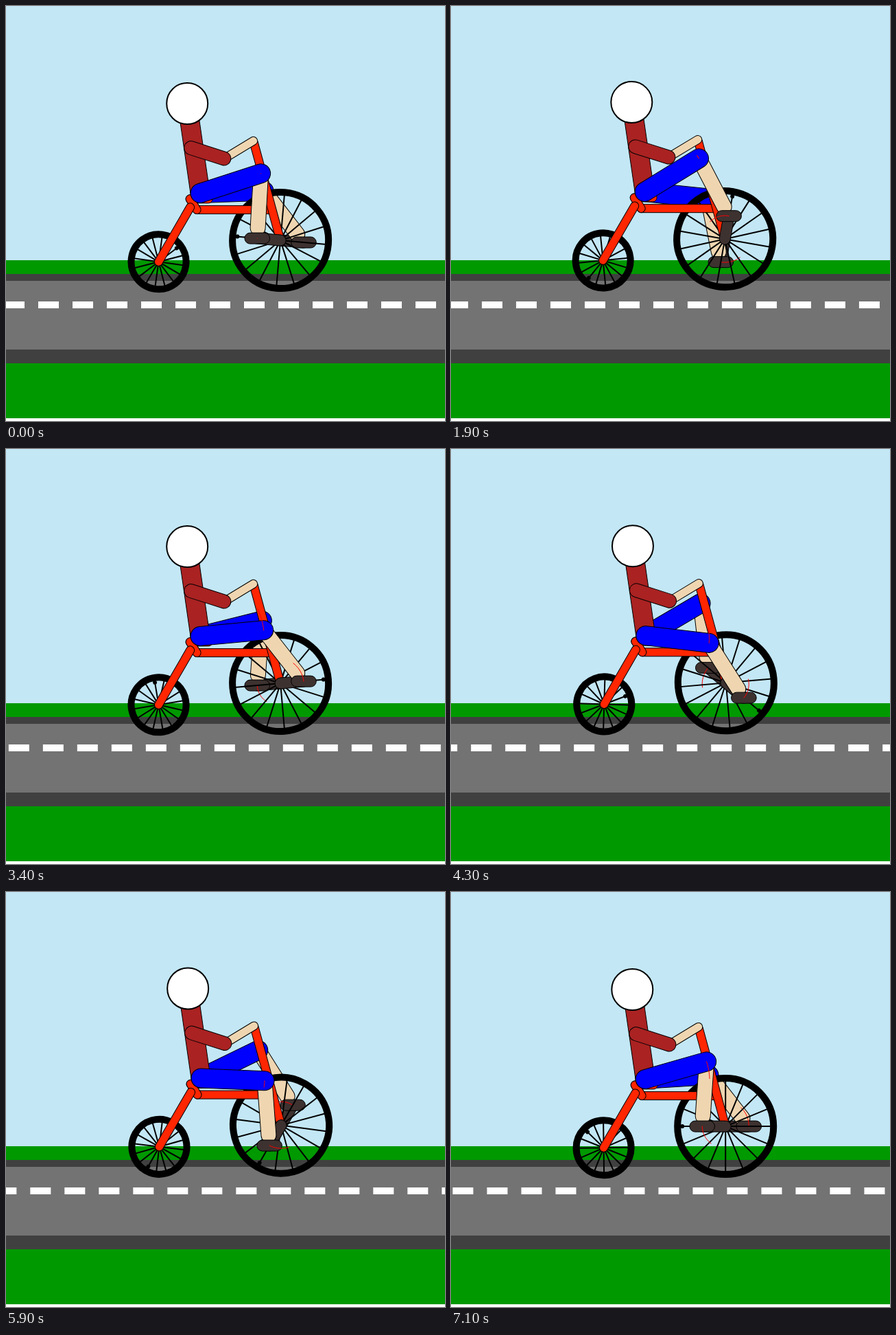
Write an HTML page that moves like this. It is 640 px wide and 604 px high and loops after 7.2 s.

```html
<!DOCTYPE html>
<html lang="en">
<head>
<meta charset="utf-8">
<title>Cyclist</title>
<style>
html, body { margin: 0; width: 100%; height: 100%; overflow: hidden; background: #fff; }
svg { display: block; width: 100vw; height: 100vh; }
</style>
</head>
<body>
<svg id="stage" viewBox="0 0 640 604" preserveAspectRatio="none"></svg>
<script>
const NS = 'http://www.w3.org/2000/svg';
const STEP = 100, STEPS = 72, TRAIL = 10, SPOKES = 16;
const RED = '#ff2600', BLUE = '#0000ff', SKIN = '#efd6b1', SHIRT = '#aa2222', SHOE = '#3d3230';
const CRANK = 34, THIGH = 93, SHIN = 94.5, ANKLE = 15;
const HIP = [-117, -68.7], AXLE = [-177.6, 31.2];
const rad = d => d * Math.PI / 180;

function add(parent, tag, attrs) {
  const el = document.createElementNS(NS, tag);
  for (const k in attrs) el.setAttribute(k, attrs[k]);
  return parent.appendChild(el);
}

// Outlined rounded bar between two points
function bar(parent, r, fill, a, b) {
  const el = add(parent, 'rect', { rx: r, height: 2 * r, fill, stroke: '#000', 'stroke-width': 1 });
  const set = (p, q) => {
    const dx = q[0] - p[0], dy = q[1] - p[1];
    el.setAttribute('x', -r);
    el.setAttribute('y', -r);
    el.setAttribute('width', Math.hypot(dx, dy) + 2 * r);
    el.setAttribute('transform',
      `translate(${p[0]} ${p[1]}) rotate(${Math.atan2(dy, dx) * 180 / Math.PI})`);
  };
  if (a) set(a, b);
  return set;
}

function wheel(parent, [x, y], r) {
  const g = add(parent, 'g', {});
  let d = '';
  for (let i = 0; i < SPOKES; i++) {
    const a = rad(i * 360 / SPOKES);
    d += `M0 0L${-r * Math.cos(a)} ${-r * Math.sin(a)}`;
  }
  add(g, 'path', { d, stroke: '#000', 'stroke-width': 2 });
  add(g, 'circle', { r, fill: 'none', stroke: '#000', 'stroke-width': 10 });
  add(g, 'circle', { cx: 7 - r, r: 3 });
  return a => g.setAttribute('transform', `translate(${x} ${y}) rotate(${a})`);
}

function makeLeg(parent) {
  const crank = bar(parent, 8, SHOE);
  const shin = bar(parent, 11, SKIN);
  const shoe = bar(parent, 8, SHOE);
  const thigh = bar(parent, 14, BLUE);
  return (pedal, knee) => {
    const k = ANKLE / SHIN;
    crank([0, 0], pedal);
    shin(knee, [pedal[0] + (knee[0] - pedal[0]) * k, pedal[1] + (knee[1] - pedal[1]) * k]);
    shoe([pedal[0] - 10.3, pedal[1]], [pedal[0] + 10.3, pedal[1]]);
    thigh(HIP, knee);
  };
}

const makeTrail = parent => add(parent, 'path',
  { fill: 'none', stroke: '#f00', 'stroke-width': 1, 'stroke-linecap': 'round' });

// Motion
const turn = n => 5 * (n + 1);
const hub = n => {
  const a = rad(turn(n));
  return [400.2 - Math.sin(a), 340.1 + Math.cos(2 * a)];
};
const pedalAt = (n, phase) => {
  const a = rad(turn(n) + phase);
  return [-CRANK * Math.cos(a), -CRANK * Math.sin(a)];
};
function kneeFor(p) {
  const dx = p[0] - HIP[0], dy = p[1] - HIP[1], d = Math.hypot(dx, dy);
  const along = (d * d + THIGH * THIGH - SHIN * SHIN) / (2 * d);
  const off = Math.sqrt(THIGH * THIGH - along * along);
  return [HIP[0] + (dx * along + dy * off) / d, HIP[1] + (dy * along - dx * off) / d];
}
function trace(el, n, at) {
  const c = hub(n), pts = [];
  for (let i = Math.max(0, n - TRAIL); i <= n; i++) {
    const p = at(i), h = hub(i);
    pts.push(`${p[0] + h[0] - c[0]} ${p[1] + h[1] - c[1]}`);
  }
  if (n === 0) pts.push(pts[0]);
  el.setAttribute('d', 'M' + pts.join('L'));
}

// Scenery
const stage = document.getElementById('stage');
const band = (y, height, fill) => add(stage, 'rect', { y, width: 640, height, fill });
band(0, 370, '#c3e7f5');
band(370, 230, '#009900');
band(390, 130, '#404040');
band(400, 100, '#737373');
const dashes = add(stage, 'path',
  { d: 'M0 435H750', stroke: '#fff', 'stroke-width': 10, 'stroke-dasharray': '30 20' });

// Bike and rider, placed around the pedal axle
const rider = add(stage, 'g', {});
const farLeg = makeLeg(rider);
const farTrail = makeTrail(rider);
const bigWheel = wheel(rider, [0, 0], 70);
const smallWheel = wheel(rider, AXLE, 40);
bar(rider, 6, RED, [-132, -60.2], [-105, -60.2]);
bar(rider, 6, RED, [-122, -44.5], [-17, -44.5]);
bar(rider, 6, RED, [-132, -60.2], [-122, -44.5]);
bar(rider, 6, RED, [-131.5, -48.2], AXLE);
bar(rider, 14, SHIRT, [-135.9, -199.1], HIP);
add(rider, 'circle',
  { cx: -135.9, cy: -199.1, r: 30, fill: '#fff', stroke: '#000', 'stroke-width': 2 });
bar(rider, 6, RED, [-39, -143], [0, 0]);
bar(rider, 6, SKIN, [-82, -119], [-39.5, -144.7]);
bar(rider, 10, SHIRT, [-130.5, -134.5], [-82.2, -119.1]);
const nearLeg = makeLeg(rider);
const nearTrail = makeTrail(rider);
const kneeTrail = makeTrail(rider);

function draw(ms) {
  const n = Math.floor(ms / STEP) % STEPS;
  const near = pedalAt(n, 0), far = pedalAt(n, 180);
  rider.setAttribute('transform', `translate(${hub(n)})`);
  const shift = ((47 - 2.74 * n) % 50 + 50) % 50 - 50;
  dashes.setAttribute('transform', `translate(${shift} 0)`);
  bigWheel(turn(n));
  smallWheel(143 + 8.75 * n);
  farLeg(far, kneeFor(far));
  nearLeg(near, kneeFor(near));
  trace(farTrail, n, i => pedalAt(i, 180));
  trace(nearTrail, n, i => pedalAt(i, 0));
  trace(kneeTrail, n, i => kneeFor(pedalAt(i, 0)));
}

const start = performance.now();
function tick() {
  draw(performance.now() - start);
  requestAnimationFrame(tick);
}
draw(0);
requestAnimationFrame(tick);
</script>
</body>
</html>
```
